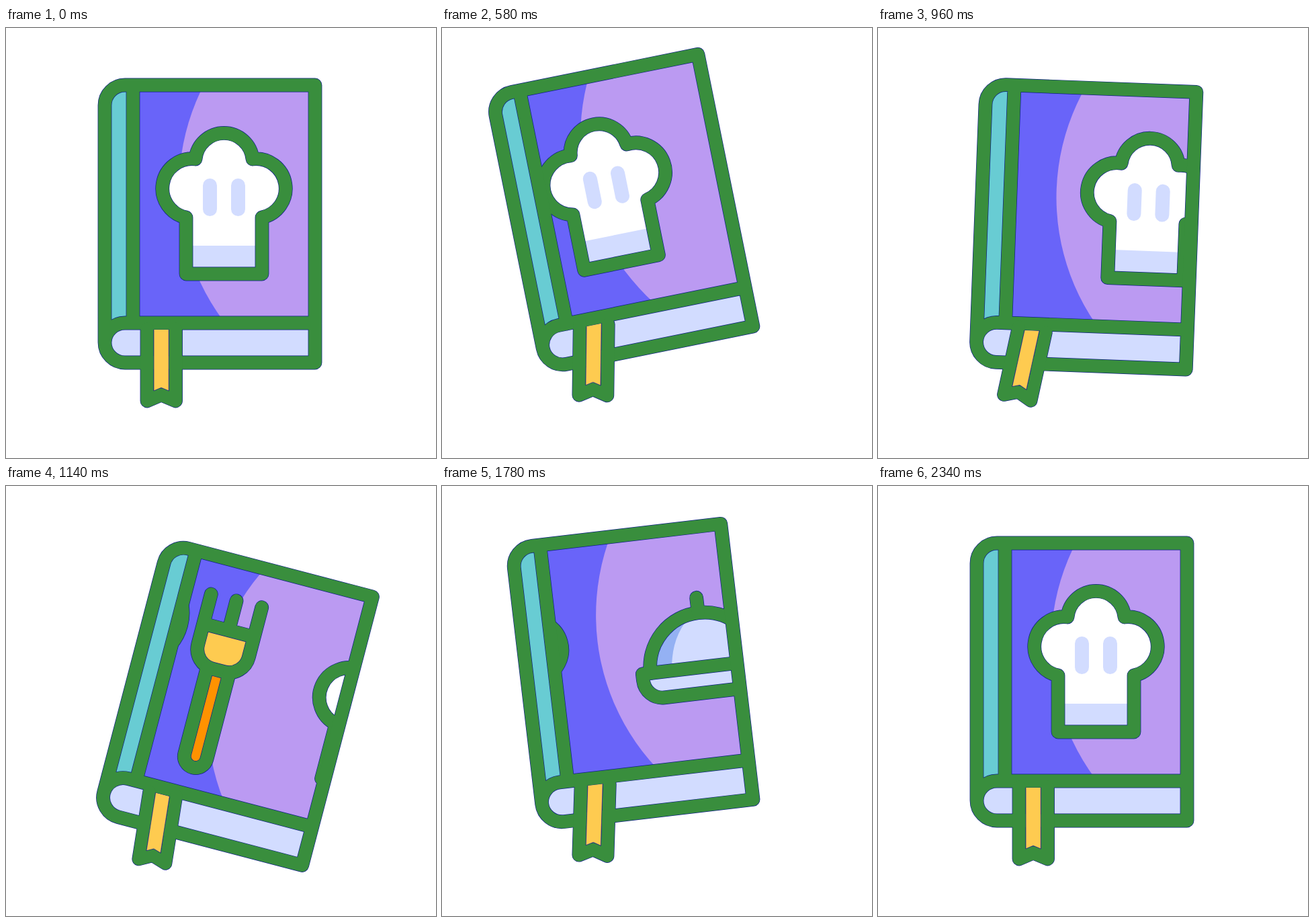
An HTML page that plays this animation: 640 px wide and 640 px high, repeating every 2400 ms.

```html
<!DOCTYPE html>
<html lang="en">
<head>
<meta charset="utf-8">
<title>Recipe book</title>
<style>
  html, body { margin: 0; width: 100%; height: 100%; overflow: hidden; background: #fff; }
  svg { display: block; width: 100%; height: 100%; }
</style>
</head>
<body>
<svg viewBox="0 0 640 640">
  <defs>
    <clipPath id="coverClip"><rect x="189" y="85" width="271" height="354"/></clipPath>
    <clipPath id="belowCover"><rect x="100" y="449" width="300" height="200"/></clipPath>

    <path id="hat" d="M-56.5 366V282A44.1 44.1 0 0 1 -42.5 195A42.7 42.7 0 0 1 42.5 195A44.1 44.1 0 0 1 56.5 282V366Z"/>
    <path id="forkHead" d="M-39 142V219a30 30 0 0 0 30 30H9a30 30 0 0 0 30-30V142M-39 187.5H39M0 142V187.5"/>
    <path id="handle" d="M-17 250V381.5a17 17 0 0 0 34 0V250"/>
    <ellipse id="bowl" cy="198" rx="43.5" ry="56"/>
    <path id="dome" d="M-81 293.5a81 81 0 0 1 162 0"/>
    <path id="plate" d="M-93 293.5H93V303.5a28.5 28.5 0 0 1 -28.5 28.5H-64.5a28.5 28.5 0 0 1 -28.5 -28.5Z"/>

    <g id="hatFill">
      <use href="#hat" fill="#fff"/>
      <path d="M-56 324H56V366H-56Z" fill="#d2dcff"/>
      <path d="M-21 234.5V269.5M21 234.5V269.5" stroke="#d2dcff" stroke-width="21" stroke-linecap="round"/>
    </g>

    <!-- every outline, drawn once as a dark edge and once in green -->
    <g id="ink" fill="none" stroke-linecap="round" stroke-linejoin="round">
      <g clip-path="url(#coverClip)">
        <g class="strip">
          <use href="#hat"/>
          <g transform="translate(-246)"><use href="#forkHead"/><use href="#handle"/></g>
          <g transform="translate(-360)"><use href="#bowl"/><use href="#handle"/></g>
          <g transform="translate(-612)">
            <use href="#dome"/><use href="#plate"/><path d="M0 212V190"/>
          </g>
          <use href="#hat" x="-911"/>
        </g>
      </g>
      <path d="M177 85A30 30 0 0 0 147 115V468A30 30 0 0 0 177 498H460V85ZM189 85V439M460 439H177A30 29.5 0 0 0 147 468"/>
      <!-- ribbon points are relative to the point it hangs from -->
      <path class="ribbon" d="M-21 12V119L0 110L21.5 119V12"/>
    </g>
  </defs>

  <g id="book">
    <path d="M189 85H177A30 30 0 0 0 147 115V468Q150 441 177 439H189Z" fill="#68ccd3"/>
    <path d="M460 439H177A29.5 29.5 0 0 0 177 498H460Z" fill="#d2dcff"/>
    <g clip-path="url(#coverClip)">
      <rect x="189" y="85" width="271" height="354" fill="#6964f9"/>
      <circle cx="590" cy="237" r="332.5" fill="#bb9af2"/>
      <g class="strip">
        <use href="#hatFill"/>
        <g transform="translate(-246)">
          <path d="M-39 187.5V219a30 30 0 0 0 30 30H9a30 30 0 0 0 30-30V187.5Z" fill="#fecb50"/>
          <use href="#handle" fill="#ff9200"/>
        </g>
        <g transform="translate(-360)" fill="#fecb50"><use href="#handle"/><use href="#bowl"/></g>
        <g transform="translate(-612)">
          <use href="#dome" fill="#94b1f3"/>
          <path d="M-8 213Q-44 240 -49 293.5H81A81 81 0 0 0 0 212.5Z" fill="#d2dcff"/>
          <use href="#plate" fill="#d2dcff"/>
        </g>
        <use href="#hatFill" x="-911"/>
      </g>
    </g>
    <use href="#ink" stroke="#0f1f88" stroke-width="20.8"/>
    <use href="#ink" stroke="#398e3d" stroke-width="19.4"/>
    <g clip-path="url(#belowCover)">
      <path class="ribbon" d="M-11 0V104L0 99.3L11.3 104V0Z" fill="#fecb50" stroke="#0f1f88" stroke-width=".7"/>
    </g>
  </g>
</svg>
<script>
  const LOOP = 2400;
  const turned = deg => [Math.cos(deg * Math.PI / 180), Math.sin(deg * Math.PI / 180)];

  const tilt = [[202, [0]], [697, [-13.3]], [1206, [16]], [1697, [-7.25]], [2200, [0]]];
  const slide = [[200, [0]], [604, [-38]], [2300, [911]]];
  // The ribbon's points move straight from pose to pose
  const swing = [[200, 0], [790, 17.1], [1390, -19], [1840, 9.8], [2330, 0]]
    .map(([time, deg]) => [time, turned(deg)]);

  const book = document.getElementById("book");
  const strips = document.querySelectorAll(".strip");
  const ribbons = document.querySelectorAll(".ribbon");

  // Eased values between [time, values] keys
  function track(keys, t) {
    if (t <= keys[0][0]) return keys[0][1];
    for (let i = 1; i < keys.length; i++) {
      const [t0, from] = keys[i - 1], [t1, to] = keys[i];
      if (t < t1) {
        const u = (t - t0) / (t1 - t0);
        const eased = u * u * (3 - 2 * u);
        return from.map((v, n) => v + (to[n] - v) * eased);
      }
    }
    return keys[keys.length - 1][1];
  }

  const setAll = (nodes, value) => nodes.forEach(n => n.setAttribute("transform", value));

  function draw(t) {
    const [angle] = track(tilt, t);
    const [shift] = track(slide, t);
    const [cos, sin] = track(swing, t);
    book.setAttribute("transform", `rotate(${angle} 192.5 456.5)`);
    setAll(strips, `translate(${324.5 + shift})`);
    setAll(ribbons, `matrix(${cos} ${sin} ${-sin} ${cos} 231 436)`);
  }

  const start = performance.now();
  function tick() {
    draw((performance.now() - start) % LOOP);
    requestAnimationFrame(tick);
  }
  tick();
</script>
</body>
</html>
```
